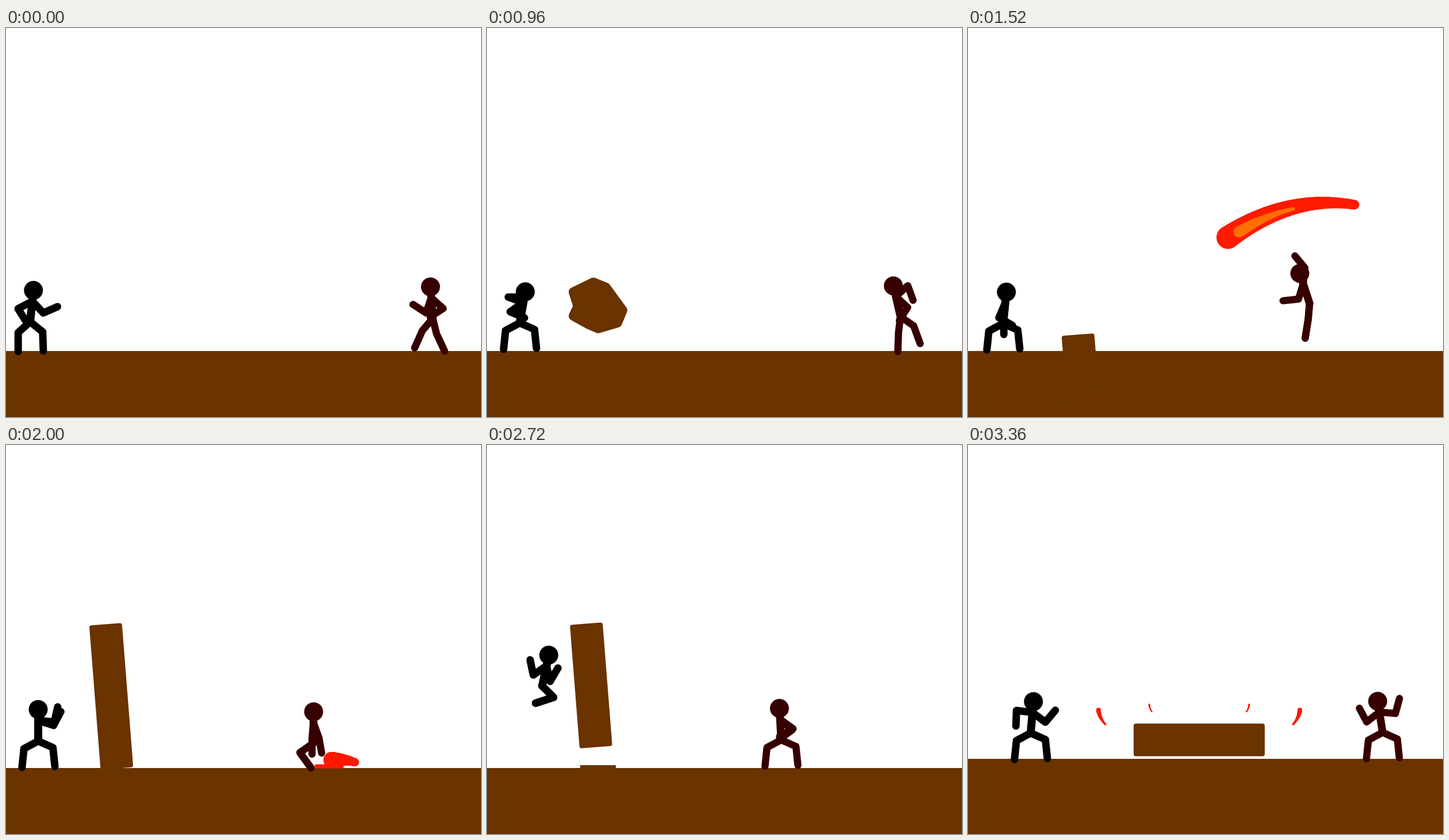
Animation of 826 by 678 pixels, one loop 3.44 s. Source, as an HTML page with a canvas:

```html
<!DOCTYPE html>
<html lang="en">
<head>
<meta charset="utf-8">
<title>Stick duel</title>
<style>
html, body { margin: 0; width: 100%; height: 100%; overflow: hidden; background: #fff; }
canvas { display: block; }
</style>
</head>
<body>
<canvas id="stage" width="826" height="678"></canvas>
<script>
const ctx = document.getElementById('stage').getContext('2d');
const STEP = 80, COUNT = 43, GROUND = 563;
const EARTH = '#6a3300', FIRE = '#ff1a00', GLOW = '#ff7000';

// A pose is the hip position, the lean, then bone angles in degrees (90 points down).
const SQUAT = [152, 96, 24, 84];
const pose = (x, y, lean, arms, legs = SQUAT) => [x, y, lean, ...arms, ...legs];

const black = {
  guard: pose(42, 512, -84, [152, 58, 47, -24], [138, 90, 39, 88]),
  coil: pose(57, 514, -80, [200, 0, 145, 23]),
  lift: pose(61, 515, -84, [113, 30, 95, 90]),
  raise: pose(56, 516, -90, [18, -62, 6, -77]),
  leap: pose(96, 420, -78, [145, -102, 77, -60], [45, 162, 45, 162]),
  strike: pose(202, 434, -84, [169, 58, -46, -53], [-24, 59, 92, 73]),
  brace: pose(109, 518, -85, [187, 92, 37, -50])
};
const maroon = {
  guard: pose(742, 506, -94, [109, 213, 42, 147], [130, 114, 76, 65]),
  coil: pose(719, 503, -103, [43, 122, -42, 70], [97, 92, 35, 70]),
  kick: pose(594, 480, -108, [-84, 230, 107, 174], [95, 99, 95, 99]),
  crouch: pose(534, 520, -89, [70, 80, 95, 90], [145, 54, 145, 54]),
  ready: pose(501, 513, -91, [10, 155, 60, 183]),
  block: pose(554, 518, -102, [171, 99, -60, 20]),
  brace: pose(721, 517, -99, [142, 242, 5, -75])
};

const blackTrack = [
  [0, black.guard], [12, black.coil], [19, black.lift], [23, black.raise], [28, black.raise],
  [34, black.leap], [38, black.strike], [41, black.brace]
];
const maroonTrack = [
  [0, maroon.guard], [12, maroon.coil], [14, maroon.coil],
  [17, [669, 386, ...maroon.kick.slice(2)]], [19, maroon.kick], [22, maroon.crouch],
  [28, maroon.crouch], [33, maroon.ready], [38, maroon.block], [41, maroon.brace]
];
const rockTrack = [[7, [193, 630, 0]], [11, [193, 484, 0]], [12, [193, 484, 0]], [15, [655, 450, 0.9]]];

// Centre, tilt and length of the earth slab: rise, cut, flight, fall.
const riseTrack = [[19, [201, 660, -4.5, 252]], [23, [183, 438, -4.5, 252]]];
const flightTrack = [[34, [181, 419, -4.5, 216]], [38, [418, 455, 28.7, 226]], [41, [402, 530, 90, 228]]];

const mix = (a, b, k) => a + (b - a) * k;
const clamp = k => Math.min(1, Math.max(0, k));

function at(track, f) {
  let i = 0;
  while (i < track.length - 2 && f >= track[i + 1][0]) i++;
  const [t0, a] = track[i], [t1, b] = track[i + 1];
  const k = clamp((f - t0) / (t1 - t0));
  return a.map((v, n) => mix(v, b[n], k));
}

function line(color, width, ...pts) {
  ctx.strokeStyle = color;
  ctx.lineWidth = width;
  ctx.beginPath();
  for (let i = 0; i < pts.length; i += 2) ctx.lineTo(pts[i], pts[i + 1]);
  ctx.stroke();
}

function disc(color, x, y, r) {
  ctx.fillStyle = color;
  ctx.beginPath();
  ctx.arc(x, y, r, 0, Math.PI * 2);
  ctx.fill();
}

// Tapering stroke along a quadratic curve.
function brush(color, [x0, y0, cx, cy, x1, y1], r0, r1, from = 0, to = 1) {
  for (let i = 0; i <= 80; i++) {
    const k = i / 80, t = mix(from, to, k);
    disc(color, mix(mix(x0, cx, t), mix(cx, x1, t), t),
      mix(mix(y0, cy, t), mix(cy, y1, t), t), mix(r1, r0, (1 - k) ** 1.2));
  }
}

function reach([x, y], angle, length) {
  const a = angle * Math.PI / 180;
  return [x + Math.cos(a) * length, y + Math.sin(a) * length];
}

function figure([x, y, lean, ...angles], color, width) {
  const hip = [x, y], shoulder = reach(hip, lean, 36), head = reach(hip, lean, 55);
  line(color, width + 1, ...hip, ...head);
  for (let i = 0; i < 8; i += 2) {
    const [root, upper, lower] = i < 4 ? [shoulder, 28, 27] : [hip, 28, 33];
    const joint = reach(root, angles[i], upper);
    line(color, width, ...root, ...joint, ...reach(joint, angles[i + 1], lower));
  }
  disc(color, ...head, 16.5);
}

function rock(f) {
  if (f < 8 || f > 16) return;
  if (f > 14) {
    const age = f - 14;
    for (let i = 0; i < 9; i++) {
      const [x, y] = reach([680, 462 + age * 18], i * 137, 18 + age * (10 + i % 4 * 3));
      disc(EARTH, x, y, 15 - age * 4 - i % 3);
    }
    return;
  }
  const [x, y, turn] = at(rockTrack, f);
  ctx.save();
  ctx.translate(x, y);
  ctx.rotate(turn);
  line(EARTH, 16, -43,-24, -8,-41, 14,-32, 43,8, 34,30, 0,40, -16,33, -43,18, -35,1, -43,-24);
  ctx.fillStyle = EARTH;
  ctx.fill();
  ctx.restore();
}

function comet(f) {
  if (f < 17 || f > 22) return;
  const fall = Math.max(0, f - 19);
  ctx.save();
  ctx.translate(-91 * fall, 52 * fall);
  const arc = [452, 365, 560, 290, 672, 308];
  brush(FIRE, arc, 20, 8.5, Math.max(0, (19 - f) / 3));
  ctx.translate(0, 3);
  if (f > 18) brush(GLOW, arc, 10, 3, 0.09, 0.52);
  ctx.restore();
}

function sweep(f) {
  if (f < 23 || f > 30) return;
  const k = clamp((f - 22) / 3), x = 566 - Math.max(0, f - 27) * 130;
  brush(FIRE, [x, 549, x + 20, 547, x + 41, 553], 14 * k, 7 * k);
  if (f < 28) line(FIRE, 7, 540, 560, 584, 560);
}

function slab(f) {
  if (f < 19) return;
  const [x, y, tilt, length] = at(f < 30 ? riseTrack : flightTrack, f);
  ctx.fillStyle = EARTH;
  ctx.save();
  ctx.translate(x, y);
  ctx.rotate(tilt * Math.PI / 180);
  ctx.beginPath();
  ctx.roundRect(-28.5, -length / 2, 57, length, 4);
  ctx.fill();
  ctx.restore();
  // The stump slides away as the view pans.
  if (f >= 30 && f < 41) ctx.fillRect(162 - 15.3 * Math.max(0, f - 35), 558, 62, 8);
}

function clash(f) {
  if (f >= 36 && f < 40) {
    const x = 60 * (1 - clamp((f - 35) / 3));
    line(FIRE, 25, 439 + x, 495, 427 + x, 533, 457 + x, 557);
  }
  if (f >= 37 && f < 40) {
    brush('#66613d', [515, 558, 505, 558, 492, 558], 5, 3);
    brush('#666', [573, 560, 563, 560, 550, 561], 5, 3.5);
  }
  if (f > 40) {
    for (const side of [-1, 1]) {
      const px = d => 402 + side * (d - (42 - f) * 35);
      brush(FIRE, [px(175), 478, px(174), 491, px(163), 503], 4, 1.5);
      brush(FIRE, [px(87), 468, px(86), 476, px(82), 481], 1.2, 0.8);
    }
  }
}

function draw(f) {
  // The falling slab jolts the whole scene.
  const jolt = f === 41 ? 12 : f === 42 ? -16 : 0;
  ctx.fillStyle = '#fff';
  ctx.fillRect(0, 0, 826, 678);
  ctx.save();
  ctx.translate(0, jolt);
  ctx.lineCap = ctx.lineJoin = 'round';
  ctx.fillStyle = EARTH;
  ctx.fillRect(0, GROUND, 826, 140);
  comet(f);
  sweep(f);
  slab(f);
  rock(f);
  clash(f);
  figure(at(blackTrack, f), '#000', 13);
  figure(at(maroonTrack, f), '#360000', 12.5);
  ctx.restore();
}

let start;
function tick(now) {
  start ??= now;
  draw(Math.floor((now - start) / STEP) % COUNT);
  requestAnimationFrame(tick);
}
draw(0);
requestAnimationFrame(tick);
</script>
</body>
</html>
```
